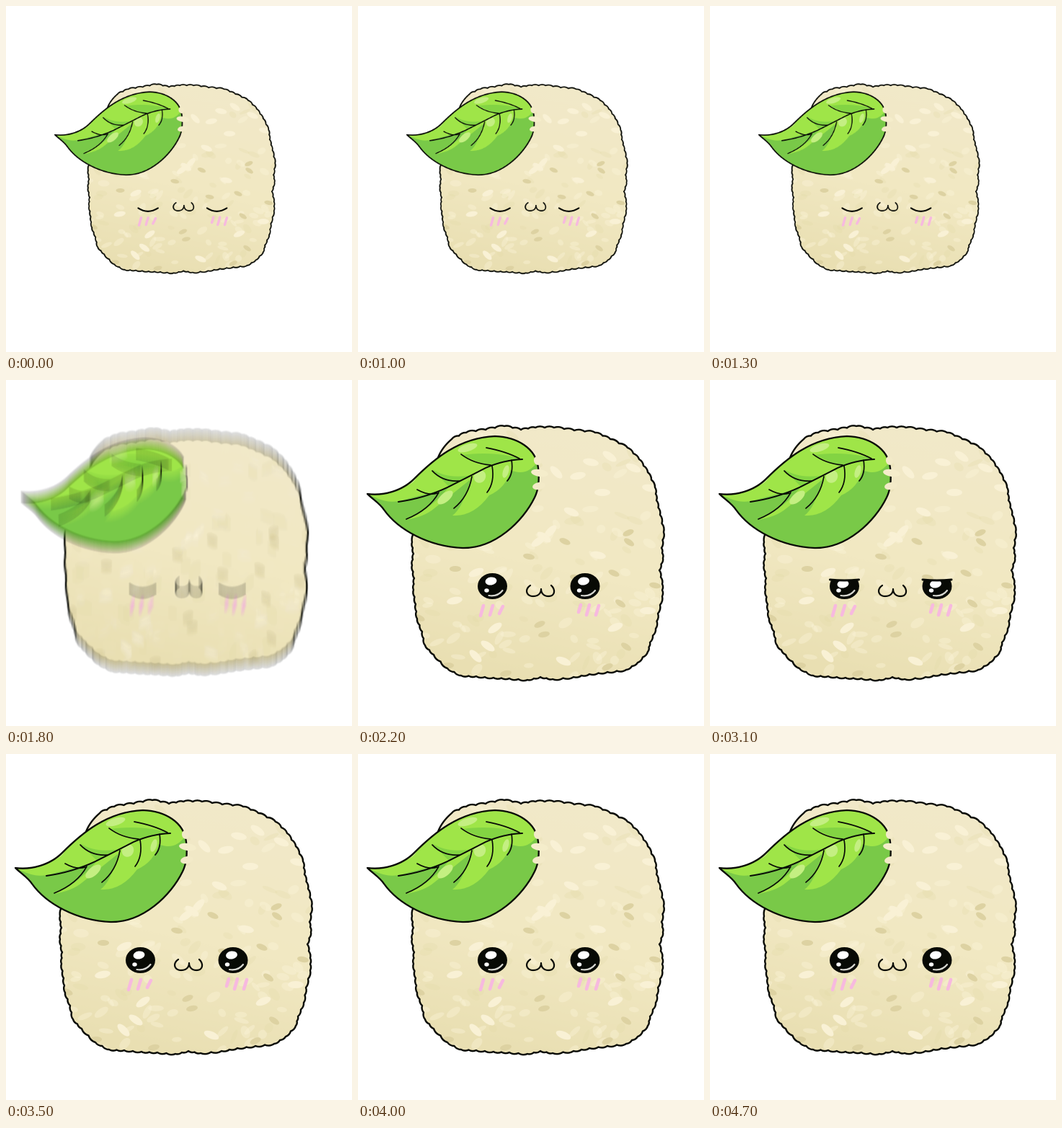
An HTML page with a canvas for the animation above (4800 ms loop, 480 by 480 pixels).

```html
<!DOCTYPE html>
<html>
<head>
<meta charset="utf-8">
<style>
html, body { margin: 0; width: 100%; height: 100%; overflow: hidden; background: #fff; }
canvas { display: block; }
</style>
</head>
<body>
<canvas id="stage" width="480" height="480"></canvas>
<script>
const stage = document.getElementById('stage').getContext('2d');
const LOOP = 4800, SIZE = 480, INK = '#080a05';

// Rice outline, clockwise from the top left
const RIM = [
  130,82, 150,73, 177,69, 203,64, 226,69, 246,66, 272,66, 300,70, 329,73,
  350,82, 374,94, 390,110, 402,128, 412,149, 414,167, 419,187, 424,211,
  421,233, 423,247, 418,264, 422,283, 422,300, 416,324, 413,345, 405,364,
  402,377, 388,392, 372,402, 346,405, 321,408, 299,412, 270,415, 253,412,
  235,416, 210,414, 188,413, 164,411, 143,410, 124,400, 105,381, 93,368,
  89,349, 82,331, 80,311, 77,291, 78,275, 75,257, 77,241, 75,225, 84,195
];

let seed = 11;
const rnd = () => (seed = (seed * 16807) % 2147483647) / 2147483647;

function layer(draw) {
  const c = document.createElement('canvas');
  c.width = c.height = SIZE * 2;
  const g = c.getContext('2d');
  g.scale(2, 2);
  g.lineCap = g.lineJoin = 'round';
  draw(g);
  return c;
}

function oval(g, x, y, rx, ry, color, turn = 0) {
  g.fillStyle = color;
  g.beginPath();
  g.ellipse(x, y, rx, ry, turn, 0, 7);
  g.fill();
}

function stroke(g, d, width, color = INK) {
  g.lineWidth = width;
  g.strokeStyle = color;
  g.stroke(new Path2D(d));
}

function ricePath() {
  const p = new Path2D(), n = RIM.length / 2;
  p.moveTo(RIM[0], RIM[1]);
  for (let i = 0; i < n; i++) {
    const j = (i + 1) % n;
    const x = RIM[2 * i], y = RIM[2 * i + 1];
    const dx = RIM[2 * j] - x, dy = RIM[2 * j + 1] - y;
    for (const k of [0, 0.5]) {
      p.quadraticCurveTo(x + dx * (k + 0.25) + dy * 0.13, y + dy * (k + 0.25) - dx * 0.13,
        x + dx * (k + 0.5), y + dy * (k + 0.5));
    }
  }
  p.closePath();
  return p;
}

function drawRice(g) {
  const rice = ricePath();
  const fill = g.createLinearGradient(300, 65, 220, 415);
  fill.addColorStop(0, '#f1e9c9');
  fill.addColorStop(0.55, '#f1e8c2');
  fill.addColorStop(1, '#e9dfb2');
  g.fillStyle = fill;
  g.fill(rice);
  g.save();
  g.clip(rice);
  for (let i = 0; i < 150; i++) {
    const color = rnd() < 0.65 ? 'rgba(250,243,215,.4)' : 'rgba(224,213,163,.25)';
    oval(g, 75 + rnd() * 350, 65 + rnd() * 350, 6 + rnd() * 6, 3 + rnd() * 3, color, rnd() * 2.4 - 1.2);
  }
  const light = [267,210, 258,218, 296,183, 323,114, 339,156, 305,133, 357,343, 190,344, 163,383,
    180,369, 285,390, 333,243, 402,320, 134,306, 164,267, 250,224, 275,128, 349,106, 382,122, 405,150];
  for (let i = 0; i < light.length; i += 2)
    oval(g, light[i], light[i + 1], 11, 5, '#f9f1d5', (i * 0.7) % 1.6 - 0.8);
  const dark = [375,212, 376,225, 287,224, 237,245, 135,262, 258,353, 252,339, 364,310, 355,268,
    302,274, 125,396, 205,407, 346,398, 372,370, 85,330, 412,285];
  for (let i = 0; i < dark.length; i += 2)
    oval(g, dark[i], dark[i + 1], 8, 4, '#ddd2a2', (i * 0.5) % 1.2 - 0.4);
  g.restore();
  g.lineWidth = 2.4;
  g.strokeStyle = INK;
  g.stroke(rice);
}

function drawLeaf(g) {
  const shape = new Path2D('M13 158C35 161 61 154 78 137C105 110 140 80 190 78C220 79 247 94 250 122' +
    'C252 140 250 153 245 163C229 196 190 234 145 233C98 231 56 208 36 180C30 171 21 166 13 158Z');
  g.fillStyle = '#9fe548';
  g.fill(shape);
  g.save();
  g.clip(shape);
  g.fillStyle = '#79c948';
  g.fill(new Path2D('M13 158C40 172 52 170 68 165L125 150L112 164C90 184 78 190 66 194Q92 190 106 178' +
    'L156 138Q145 178 131 188Q160 190 182 160Q205 150 212 125Q235 135 250 112L260 240L60 240Z'));
  g.fillStyle = '#83d443';
  g.fill(new Path2D('M145 104Q190 98 228 110Q200 112 180 120ZM103 124Q125 138 157 132L127 149Z'));
  oval(g, 70, 96 + 44, 12, 5, '#c4ef82', -0.5);
  oval(g, 121, 163, 13, 6, '#c4ef82', -0.7);
  oval(g, 169, 134, 8, 9, '#c4ef82', 0.5);
  oval(g, 152, 94, 14, 5, '#c4ef82', -0.3);
  oval(g, 205, 127, 4, 9, '#c4ef82', 0.3);
  g.restore();
  stroke(g, 'M56 169Q92 164 124 149Q150 136 177 122Q202 111 228 110', 2);
  stroke(g, 'M82 152Q98 161 110 157M103 126Q118 142 142 140M143 103Q160 116 184 118M178 94Q205 99 224 109', 1.7);
  stroke(g, 'M112 156Q99 180 67 193M158 134Q153 162 133 178M186 119Q190 142 179 156M213 111Q216 130 207 140', 1.7);
  g.lineWidth = 2.3;
  g.strokeStyle = INK;
  g.stroke(shape);
  // Rice grains overlapping the leaf edge
  oval(g, 252, 129, 12, 5, '#f5edcb', 0.15);
  oval(g, 251, 147, 9, 5, '#f3eac8', -0.2);
  oval(g, 249, 112, 5, 6, '#f3eac8', -0.3);
}

function drawFace(g) {
  stroke(g, 'M239 285C231 290 233 300 243 300C250 300 254 296 254 290C254 296 258 300 264 300C274 300 274 290 268 285', 2.2);
  stroke(g, 'M174 313L170 327M187 313L183 326M201 314L196 324M309 312L306 322M321 312L317 326M334 313L330 326', 4.6, '#f7b9df');
}

const body = layer(g => { drawRice(g); drawLeaf(g); drawFace(g); });

function drawEye(g, x, lid, glint) {
  if (lid >= 1) {
    stroke(g, `M${x - 18} 295Q${x} 307 ${x + 19} 295`, 2.8);
    return;
  }
  const top = 268 + lid * 36;
  g.save();
  g.beginPath();
  g.rect(x - 24, top, 48, 40);
  g.clip();
  oval(g, x, 286, 20.5, 18, INK);
  oval(g, x - 2 + glint, 279 + lid * 16, 8, 5.5, '#fff', -0.15);
  oval(g, x - 8 - glint, 292, 3.2, 2.8, '#fff');
  stroke(g, `M${x - 5} 299Q${x + 7} 301 ${x + 14} 292`, 2.2, '#d6d6d0');
  g.restore();
  if (lid) stroke(g, `M${x - 20} ${top}Q${x} ${top + 2} ${x + 20} ${top}`, 3);
}

// Lid closure by tenth of a second
const LIDS = { 19: 1, 20: 0.55, 21: 0.2, 30: 0.12, 31: 0.25, 32: 1, 37: 0.12, 38: 0.25, 39: 1 };

function drawRoll(sx, sy, x, y, lid, glint) {
  stage.setTransform(sx, 0, 0, sy, x, y);
  stage.drawImage(body, 0, 0, SIZE, SIZE);
  drawEye(stage, 186.5, lid, glint);
  drawEye(stage, 315, lid, glint);
}

function blurred() {
  const copies = 17;
  const mix = document.createElement('canvas');
  mix.width = mix.height = SIZE;
  const m = mix.getContext('2d');
  for (let i = 0; i < copies; i++) {
    clear();
    drawRoll(0.966, 0.93, 9, 7.4 + i, 1, 0);
    m.globalAlpha = 1 / (i + 1);
    m.drawImage(stage.canvas, 0, 0);
  }
  return mix;
}

function clear() {
  stage.setTransform(1, 0, 0, 1, 0, 0);
  stage.fillStyle = '#fff';
  stage.fillRect(0, 0, SIZE, SIZE);
}

stage.lineCap = 'round';
stage.imageSmoothingQuality = 'high';
const leap = blurred();

function frame() {
  const step = Math.floor(performance.now() % LOOP / 100);
  clear();
  if (step < 18) {
    drawRoll(0.743, 0.743, 58.2, 61.2, 1, 0);
  } else if (step === 18) {
    stage.drawImage(leap, 0, 0);
  } else {
    const s = step === 19 ? 1.004 : 1, shift = 240 * (1 - s);
    const shiny = (step >= 24 && step < 28) || (step >= 43 && step < 47);
    drawRoll(s, s, shift, shift, LIDS[step] || 0, shiny ? 1.5 * Math.sin(step * Math.PI / 2 + 0.8) : 0);
  }
  requestAnimationFrame(frame);
}
frame();
</script>
</body>
</html>
```
